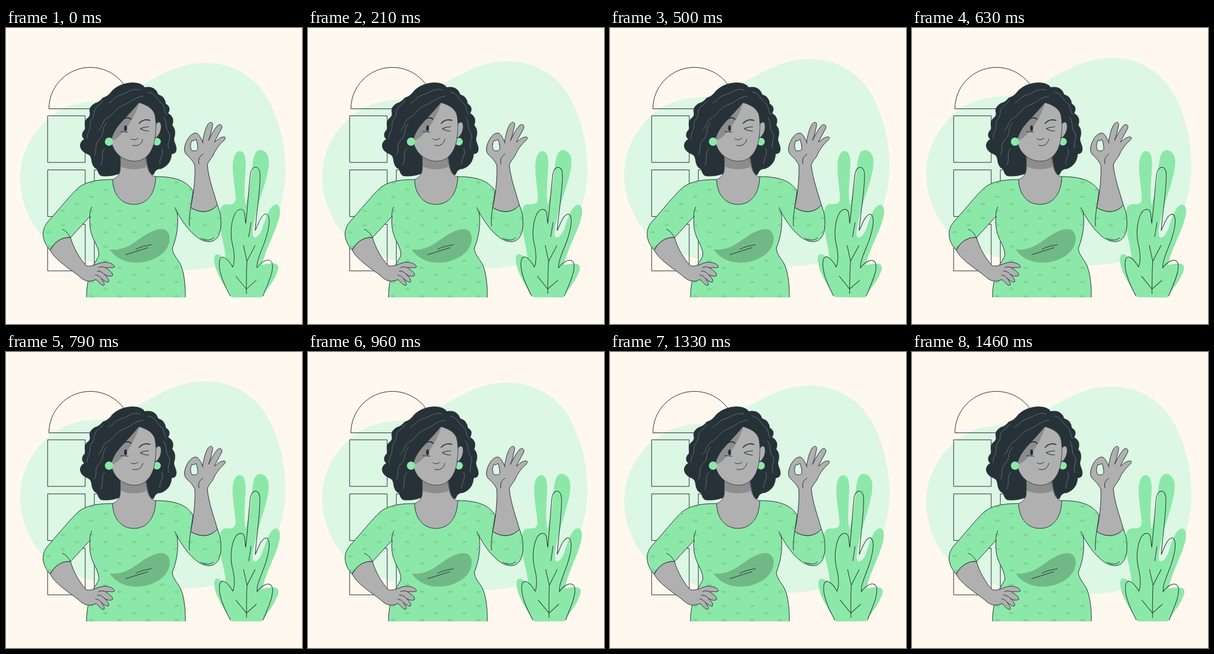
Animation of 500x500 px, one loop 1500 ms. Source, as an HTML page:

```html
<!DOCTYPE html>
<html lang="en">
<head>
<meta charset="utf-8">
<title>All good</title>
<style>
html, body { margin: 0; height: 100%; overflow: hidden; background: #fff8ee; }
svg { display: block; width: 100vw; height: 100vh; }
.line { fill: none; }
.skin { fill: #b0b0b0; }
.shade { fill: #8d8d8d; stroke: none; }
.green { fill: #8ce8a8; }
.dark { fill: #263238; }
.flat { stroke: none; }
</style>
</head>
<body>
<svg viewBox="0 0 500 500" stroke="#263238" stroke-linejoin="round">
  <defs>
    <pattern id="sprigs" width="48" height="24" patternUnits="userSpaceOnUse">
      <g id="sprig" fill="none" stroke="#62b67c" stroke-width=".9">
        <path d="M24 6.500V9.500M20 8.500Q22.500 8.500 23 11M28 8.500Q25.500 8.500 25 11"/>
      </g>
      <use href="#sprig" x="-24" y="12"/>
      <use href="#sprig" x="24" y="12"/>
    </pattern>
    <path id="dress" d="M303 455C303 438 302 416 295 400C290 390 281 382 281 372C289 352 292 330 289 311C297 325 307 341 321 352C338 366 365 368 363 325C363 315 360 307 357 299C345 313 327 313 312 303L316 275C308 264 296 251 253 251C252 281 238 298 216 298C196 298 181 283 180 256C158 256 137 258 122 270C108 283 90 306 71 327C59 341 60 358 74 375C83 360 95 353 109 354L142 318C140 338 144 350 152 365C157 377 159 383 154 390C142 408 136 430 136 455"/>
  </defs>

  <path id="blob" class="flat" fill="#dcf7e4" d="M338 59C385 59 425 85 445 125C465 165 472 205 472 240C472 290 455 345 415 375C385 397 345 409 300 409C250 411 200 408 155 398C110 387 70 370 48 335C32 308 24 283 24 255C24 205 52 165 85 143C110 126 140 124 165 123C200 120 220 100 245 88C275 72 300 59 338 59Z"/>

  <g class="line">
    <path d="M72.500 136.500A70 70 0 0 1 212.500 136.500Z"/>
    <path d="M70.300 148.300h63.500v78.700h-63.500zM70.300 239.700h63.500v78.700h-63.500zM70.300 331.500h63.500v78.700h-63.500z"/>
    <path d="M149.200 239.700h63v78.700h-63zM149.200 331.500h63v78.700h-63z"/>
  </g>

  <g id="plant">
    <path class="green flat" d="M381 455C372 440 354 415 352 395C350 381 357 380 364 386L371 390C372 378 362 350 361 325C360 302 365 297 374 298C382 298 388 297 388 288C387 268 383 252 383 235C383 218 388 208 395 208C402 208 405 217 405 230C404 255 401 285 405 299C409 285 414 260 416 235C418 215 421 206 430 206C440 207 445 217 444 230C442 255 429 285 422 315C417 335 415 348 418 353C423 356 429 349 433 339C440 318 446 298 457 298C464 300 464 311 461 322C454 348 438 374 433 400C443 398 451 396 457 399C462 402 460 409 457 415C450 432 440 441 432 455Z"/>
    <path class="line" d="M379 453C370 436 357 410 361 392C364 382 374 388 383 404C387 394 386 379 382 363C378 345 381 325 387 313C393 304 401 304 403 313C404 319 404 325 405 330C408 305 410 270 413 246C415 232 428 231 429 246C430 270 423 312 421 342C426 332 431 314 440 314C449 319 443 344 437 361C430 380 423 394 424 405C431 395 444 387 449 396C454 408 443 430 434 453"/>
    <path class="line" d="M406 449C406 430 406 412 407 394M401 367L407 394L421 367M388 419L406 441L423 426M414 328L410 353"/>
  </g>

  <path class="dark flat" d="M213 92Q229 92 234 100Q252 97 257 112Q269 116 270 128Q280 134 274 144Q286 151 281 164Q289 173 284 187Q284 191 287 198Q291 212 280 213Q279 231 262 238Q252 238 250 247Q246 250 241 250L192 246Q176 252 161 250Q156 248 154 239Q145 235 144 222Q143 214 135 212Q124 206 125 197Q127 190 132 188Q126 183 130 175Q136 170 133 164Q132 156 139 151Q143 147 141 141Q140 133 150 127Q158 125 163 118Q173 115 179 106Q192 93 213 92Z"/>
  <g class="line" stroke="#fff" stroke-opacity=".4" stroke-width=".7">
    <path d="M227 105C214 100 205 110 194 113C184 116 181 123 173 127M232 115C216 117 211 126 199 130C185 135 182 147 171 152C161 158 164 168 155 174"/>
    <path d="M164 122C159 132 149 132 149 143C149 153 141 155 142 164C143 173 136 177 137 187M170 160C160 172 167 180 157 189C148 198 155 207 149 215M167 203C159 211 166 221 160 232"/>
    <path d="M240 108C253 110 254 121 263 127C269 133 266 140 272 147M266 150C273 159 268 168 275 177C280 186 271 193 275 204M263 203C268 214 258 220 260 230"/>
  </g>

  <path class="skin flat" d="M193 205V234C194 246 188 253 180 256C181 283 196 298 216 298C238 298 252 281 253 251C243 249 238 239 236 205Z"/>
  <path class="shade" d="M193 205V234C206 240 223 240 237 235L236 205Z"/>
  <path class="line" stroke-width=".8" d="M193 219V234C194 246 188 253 180 256M236 217C238 239 243 250 253 251"/>

  <circle class="green flat" cx="255" cy="192" r="6.500"/>
  <path class="skin" stroke-width=".8" d="M252 166C254 158 261 156 262 164C263 173 258 183 252 186Z"/>
  <path class="skin" stroke-width=".8" d="M225 126C216 137 206 147 197 157C186 169 180 179 178 190C180 211 199 225 217 225C235 225 247 211 251 190C254 173 254 156 251 145C247 135 238 130 225 126Z"/>
  <path class="shade" d="M225 126C216 137 206 147 197 157C186 169 180 179 178 191C188 188 198 177 207 164C215 152 221 140 225 126Z"/>
  <circle class="green flat" cx="174" cy="192" r="7"/>

  <ellipse class="dark flat" cx="202" cy="169.500" rx="2.500" ry="5"/>
  <g class="line" stroke-linecap="round">
    <path stroke-width="1.800" d="M196 156C201 151 207 150 211 154M225 161C229 156 236 154 243 156"/>
    <path stroke-width="1.200" d="M194 175L206 176M241 167C236 167 231 168 227 170C231 173 236 174 241 174"/>
    <path d="M211 187C214 190 220 189 223 186M214 198C222 201 230 196 231 188"/>
  </g>

  <use href="#dress" class="green"/>
  <use href="#dress" fill="url(#sprigs)" stroke="none"/>
  <path class="line" d="M145 302C142 309 141 315 142 320M285 303L289 311M312 303C310 315 309 326 310 335M329 355C337 360 346 359 351 354M95 340C101 342 105 347 109 354"/>
  <path class="flat" fill="#70b986" d="M175 374C190 376 205 371 220 360C240 345 255 338 266 340C275 342 278 352 276 361C272 380 255 390 235 395C212 399 190 395 175 374Z"/>
  <path class="line" d="M202 383L240 371M219 374C228 369 236 368 246 366"/>

  <path class="skin" d="M75 375C80 389 105 405 122 418C130 426 137 429 146 427L152 425C156 428 161 435 165 435C168 433 165 429 161 423C166 427 170 430 173 429C175 426 172 422 166 416C172 420 177 420 180 418C181 414 176 410 168 405C174 404 180 406 183 404C184 400 176 396 167 395.500C158 396 152 400 147 401C143 402 139 403 135 401C125 390 114 372 109 354C95 353 83 360 75 375Z"/>
  <path class="line" d="M168 405C164 403 160 403 156 405M166 416C162 412 158 410 154 411M161 423C158 419 155 418 151 417"/>

  <path class="skin" fill-rule="evenodd" d="M319 232C316 224 309 218 304 213C299 206 302 196 308 186C312 180 318 176 323 178C327 181 329 186 332 192C334 182 336 171 341 163C344 158 350 158 349 164C347 174 345 183 342 190C346 182 351 172 357 165C361 161 367 164 364 170C360 178 355 186 352 193C357 189 362 184 368 184C372 184 371 187 368 190C360 197 353 207 350 215C346 222 341 226 340 232C343 258 352 280 357 299C345 313 327 313 312 303C317 280 320 255 319 232ZM314 190C311 196 311 203 314 207C318 208 323 208 324 204C324 198 323 194 321 188C319 190 316 191 314 190Z"/>
  <path class="line" d="M333 213C327 216 324 222 326 230M332 192L333 195"/>
</svg>
<script>
const LOOP = 1500, STEPS = 36;
const blob = document.getElementById("blob");
const plant = document.getElementById("plant");

// Triangle wave: 0 at the start, 1 halfway, 0 at the end.
const triangle = p => 1 - Math.abs(1 - 2 * (p - Math.floor(p)));

function draw(now) {
  const step = Math.floor(((now + 5) % LOOP) / (LOOP / STEPS));
  const p = step / STEPS;
  blob.setAttribute("transform", `translate(0 ${-10 * triangle(p)})`);
  plant.setAttribute("transform", `rotate(${2 * triangle(p + 0.25) - 1} 407 331)`);
  requestAnimationFrame(draw);
}
draw(performance.now());
</script>
</body>
</html>
```
